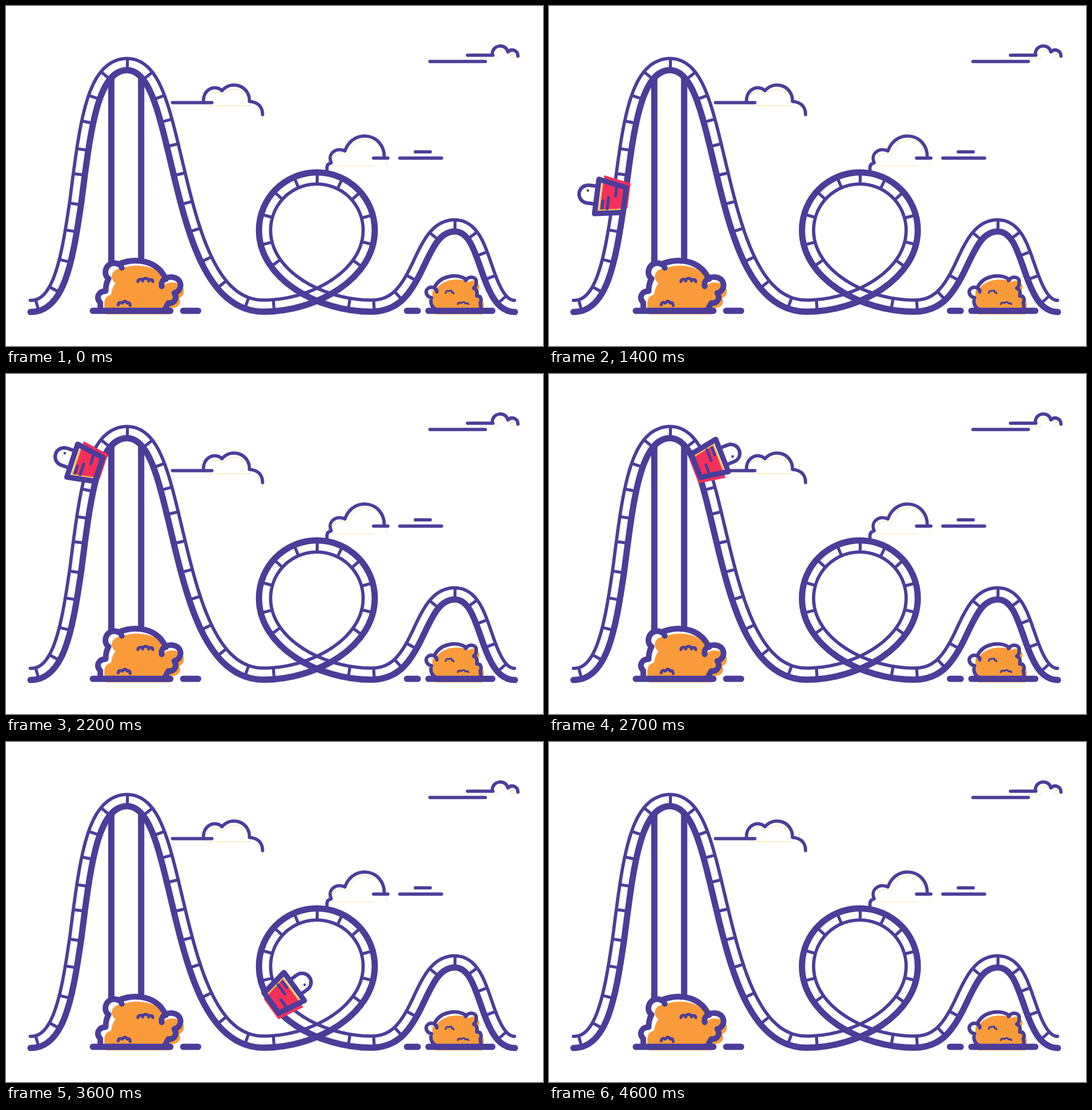
Recreate the animation shown at these times as an HTML page. Size 900 by 570 pixels, loop 5600 ms.

```html
<!DOCTYPE html>
<html lang="en">
<head>
<meta charset="utf-8">
<title>Roller coaster</title>
<style>
  html, body { margin: 0; width: 100%; height: 100%; overflow: hidden; background: #fff; }
  svg { display: block; width: 900px; height: 570px; }
  .ink { fill: none; stroke: #4b3d99; stroke-linecap: round; stroke-linejoin: round; }
  .thin { stroke-width: 5.5; }
  .thick { stroke-width: 10.5; }
  .butt { stroke-linecap: butt; }
  .orange { fill: #f99b3b; }
  .hint { fill: none; stroke: #fbd78c; stroke-width: .8; }
</style>
</head>
<body>
<svg viewBox="0 0 900 570">
  <clipPath id="ride"><rect x="29.5" y="20" width="836.5" height="520"/></clipPath>

  <!-- clouds -->
  <path class="hint" d="M333 167H408M364 149C374 137 394 136 403 149M339 148C346 142 354 142 360 148L365 148
    M548 268H618M638 258V268M573 249C581 221 616 215 628 239M549 262C548 249 560 245 573 249
    M843 87H861M815 87H828M822 79Q830 70 838 79"/>
  <path class="ink thin" d="M773.500 82.500H816M710.500 93H803.500M815 82C814 64 838 62 841 77C848 70 858 75 858 84
    M279 162H345M331 160C330 139 351 131 362 142C378 123 409 134 408 160C422 161 430 169 430 182
    M538 274C537 267 540 264 545 263C538 248 553 236 568 243C582 204 634 213 634 253
    M616 255H640M660 255H730M686 244.500H711"/>

  <!-- supports and track -->
  <path class="ink thick butt" d="M176.500 118V432M226.500 118V432"/>
  <path id="ties" class="ink butt" stroke-width="5"/>
  <path id="upper" class="ink thin"/>
  <path id="rail" class="ink thick" d="M41 513C97 513 111 433 126 331C141 215 152 107.500 203 107.500
    C243 107.500 258 188 281 283C307 392 340 512.500 432 512.500
    C520 512.500 618 457 618 376C618 322 574.600 279 521 279
    C467.400 279 424 322 424 376C424 457 522 512.500 612 512.500
    C658 512.500 679 482 700 437C716 403 728 378 752 378
    C776 378 785 410 797 444C810 482 824 513 853 513"/>

  <!-- large bush -->
  <path fill="#fff" d="M158 508V485L172 455 168 435 222 428 268 456 290 465 283 485 268 508Z"/>
  <path class="orange" d="M167 517C163 500 163 487 176 484C178 474 180 468 184 465C171 457 178 439 194 440
    C215 431 245 435 259 448L265 468C274 459 300 464 298 480C296 488 292 489 290 489C296 500 286 508 275 506L274 517Z"/>
  <path class="ink" stroke-width="9.500" d="M158 507V497C150 489 155 478 167 478C167 470 169 462 172 457
    C163 452 165 432 181 431C188 431 193 434 194 439M188 433C220 420 255 428 268 458
    M261 470C258 456 277 450 288 458C296 466 293 478 282 481C288 490 282 499 272 498L267 507"/>
  <path class="ink" stroke-width="5" d="M221 462C221 457 229 457 229 461C229 455 239 455 239 461C239 457 246 458 246 462
    M188 501q1-6 7-3q5-6 8 0q5-2 5 4"/>

  <!-- small bush -->
  <path class="orange" d="M720 517C712 505 709 500 716 493C712 480 716 472 722 473C735 456 765 456 775 463
    C785 455 796 466 793 474C790 480 790 484 792 487C802 495 803 503 798 508V517Z"/>
  <path class="ink" stroke-width="6" d="M719 508C712 503 711 497 713 489C703 487 701 475 710 472C717 470 722 475 722 479
    M718 472C727 452 757 447 772 459M770 460C775 452 790 453 788 464C788 469 786 472 784 473
    C792 478 789 482 789 486C797 485 797 494 795 497L796 507"/>
  <path class="ink" stroke-width="3" d="M737 481q1-5 5-3q5-3 5 2q3-1 3 2M757 500q1-4 6-2q5-4 7 1q4-2 5 1"/>

  <!-- ground -->
  <path class="ink thick" d="M145.500 511H275.500M297 511H322M672 511H690M708 511H815"/>

  <!-- cart: origin on the rail, x forward, -y away from the rail -->
  <g clip-path="url(#ride)">
    <g id="cart">
      <path class="ink" style="fill:#fff" stroke-width="6" d="M-13-48V-62A15 15 0 0 1 17-62V-48"/>
      <circle cx="8" cy="-63" r="2.200" fill="#4b3d99"/>
      <path fill="#fff" d="M-29-47H29L21 0H-21Z"/>
      <path fill="none" stroke="#f9c34f" stroke-width="3" d="M28-40H-22L-15 0"/>
      <path fill="#f5305a" d="M-21-39H37L29 6.500H-13Z"/>
      <path class="ink" stroke-width="9" d="M-29-47H29L21 0H-21Z"/>
      <path class="ink" stroke-width="5" d="M-18-36H-6M-18-27H1M5-16H21"/>
    </g>
  </g>
</svg>
<script>
const LOOP = 5600, STEP = 100, GAUGE = 19.5;
const $ = id => document.getElementById(id);
const rail = $('rail'), cart = $('cart'), railLength = rail.getTotalLength();

// Point on the rail with its heading
function railAt(s) {
  const mid = Math.max(.5, Math.min(railLength - .5, s));
  const a = rail.getPointAtLength(mid - .5), b = rail.getPointAtLength(mid + .5);
  const p = rail.getPointAtLength(s);
  return { s, x: p.x, y: p.y, angle: Math.atan2(b.y - a.y, b.x - a.x) };
}
const raised = (p, h) => ({ x: p.x + h * Math.sin(p.angle), y: p.y - h * Math.cos(p.angle) });
const samples = Array.from({ length: Math.floor(railLength / 2) + 1 }, (_, i) => railAt(i * 2));

function nearest(x, y, height) {
  let best, bestDistance = Infinity;
  for (const p of samples) {
    const q = raised(p, height), d = Math.hypot(q.x - x, q.y - y);
    if (d < bestDistance) { best = p; bestDistance = d; }
  }
  return best;
}

const xy = p => p.x.toFixed(1) + ' ' + p.y.toFixed(1);
$('upper').setAttribute('d', 'M' + samples.map(p => xy(raised(p, GAUGE))).join('L'));

// Middle of each cross tie
const ties = '51,500 81,475 98,428 109,377 114,331 121,283 125,240 134,194 146,153 165,115 204,97 ' +
  '239,116 260,151 274,190 284,232 295,280 308,328 320,374 340,423 364,464 405,494 449,500 ' +
  '588,430 605,398 605,353 586,318 561,297 522,289 487,296 456,317 437,352 438,398 454,429 ' +
  '575,495 617,501 656,485 681,456 716,384 753,367 785,383 802,415 815,453 833,490';
$('ties').setAttribute('d', ties.split(' ').map(pair => {
  const p = nearest(...pair.split(',').map(Number), GAUGE / 2);
  return 'M' + xy(p) + 'L' + xy(raised(p, GAUGE));
}).join(''));

// Time and place of the cart along the ride
const keys = [
  [200, 41, 513], [800, 102, 450], [1400, 126, 325], [2200, 151, 159], [2500, 182, 114],
  [2600, 203, 107], [3100, 538, 485], [3200, 618, 387], [3700, 510, 485],
  [4000, 694, 450], [4300, 776, 391], [4500, 838, 509]
].map(([t, x, y]) => ({ t, s: nearest(x, y, 0).s }));
const speeds = keys.slice(1).map((k, i) => (k.s - keys[i].s) / (k.t - keys[i].t));
const slopes = keys.map((_, i) => {
  const a = speeds[i - 1] ?? speeds[i], b = speeds[i] ?? a;
  return 2 * a * b / (a + b);
});

function distanceAt(t) {
  const i = Math.max(0, Math.min(keys.length - 2, keys.findIndex(k => k.t > t) - 1));
  const j = t >= keys.at(-1).t ? keys.length - 2 : i;
  const a = keys[j], b = keys[j + 1], span = b.t - a.t, u = (t - a.t) / span;
  return a.s + (b.s - a.s) * u * u * (3 - 2 * u)
    + span * u * (1 - u) * (slopes[j] * (1 - u) - slopes[j + 1] * u);
}

function draw(now) {
  const t = Math.floor(now % LOOP / STEP) * STEP;
  const riding = t >= 200 && t < 4600;
  cart.style.display = riding ? '' : 'none';
  if (riding) {
    const p = railAt(distanceAt(t));
    cart.setAttribute('transform', `translate(${xy(p)}) rotate(${p.angle * 180 / Math.PI})`);
  }
}

const start = performance.now();
function tick() {
  draw(performance.now() - start);
  requestAnimationFrame(tick);
}
tick();
</script>
</body>
</html>
```
